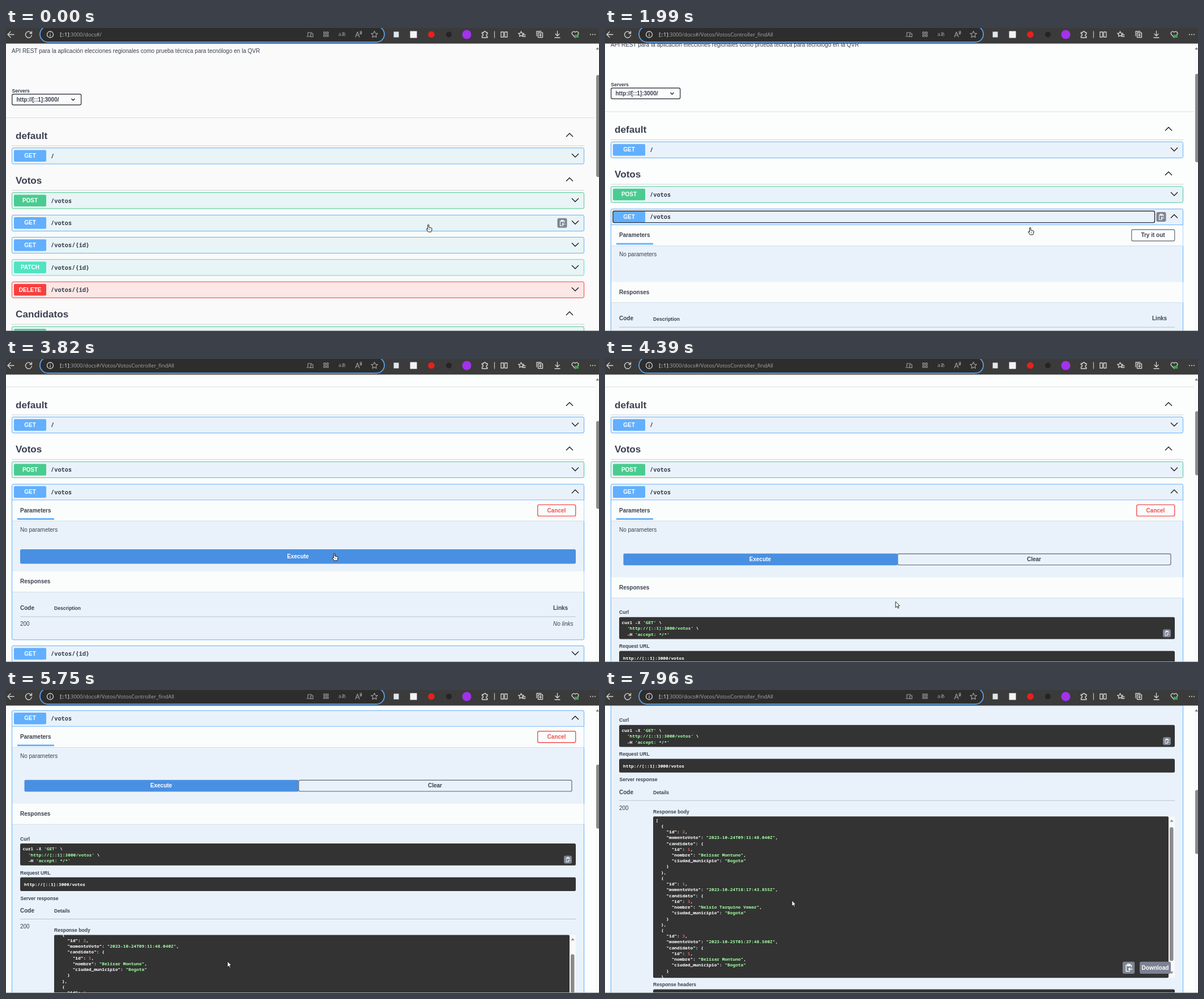
Recreate the animation shown at these times as an HTML page. Size 1047 px wide and 535 px high, loop 8 s.

```html
<!DOCTYPE html>
<html lang="es">
<head>
<meta charset="utf-8">
<title>API docs</title>
<style>
html, body { margin: 0; width: 100%; height: 100%; overflow: hidden; background: #fafafa; }
svg { display: block; width: 100%; height: 100%; --page: #fafafa; --tint: #e8f4f6; }
svg.open { --page: #fcfdfd; --tint: #e9f2fa; }
text { font-family: "Liberation Sans", Arial, sans-serif; fill: #3b4151; white-space: pre; }
.b { font-weight: 700; }
.i { font-style: italic; }
.m { text-anchor: middle; }
.w { fill: #fff; }
.mono { font-family: "Noto Sans Mono", "DejaVu Sans Mono", monospace; font-weight: 700; }
.url { font-family: "Open Sans", "Noto Sans", sans-serif; fill: #a6a6a6; }
.ico { fill: none; stroke: #d6d6d6; stroke-width: 1.1; stroke-linejoin: round; stroke-linecap: round; }
</style>
</head>
<body>
<svg id="stage" viewBox="0 0 1047 535" preserveAspectRatio="none"></svg>
<script>
const LOOP = 8000, OPEN = 1230, TRY = 3210, RESULT = 4010;
const BLOCK_Y = 330, BOX_Y = 396.5, BOX_H = 285, LINE_H = 10.23;
const BLUE = '#61affe', DARK = '#333', GREY = '#7d8492';
const METHODS = { GET: BLUE, POST: '#49cc90', PATCH: '#50e3c2', DELETE: '#f93e3e' };

// ---- markup helpers (y of a text is its visual middle)
const rect = (x, y, w, h, fill, more = '') =>
  `<rect x="${x}" y="${y}" width="${w}" height="${h}" fill="${fill}" ${more}/>`;
const text = (x, y, str, cls = '', size = 10) =>
  `<text x="${x}" y="${y + size * .36}" font-size="${size}" class="${cls}">${str}</text>`;
const small = (x, y, str) => text(x, y, str, 'b', 8.55);
const rule = (x1, x2, y, color) => rect(x1, y - .5, x2 - x1, 1, color);
const group = (id, inner, more = '') => `<g id="${id}" ${more}>${inner}</g>`;
const path = (d, more = '') => `<path d="${d}" ${more}/>`;
const chevron = (x, y, up) => {
  const k = up ? 1 : -1;
  return path(`M${x - 6} ${y + 3 * k}l6 ${-6 * k} 6 ${6 * k}`, 'fill="none" stroke="#1d1d1f" stroke-width="1.4"');
};
const frame = (x, y, w, h, color) =>
  rect(x, y, w, h, 'none', `rx="2.5" stroke="${color}" stroke-width="1.4"`);
const code = (x, y, line) => text(x, y, line
  .replace(/: (\d+)(?=,)/, ': <tspan fill="#d36363">$1</tspan>')
  .replace(/: ("[^"]*")/, ': <tspan fill="#a2fca2">$1</tspan>')
  .replace(/'[^']*'/, '<tspan fill="#a2fca2">$&</tspan>'), 'mono w', 7.82);
const copyButton = (x, y, size) => {
  const k = size / 17;
  return rect(x - size / 2, y - size / 2, size, size, GREY, 'rx="3"') +
    path('M2 5h-5.5v-8.500h7.500v3M-1.500-5h3.500v2.500h-3.500zM5.500 2h-5M2 0l-2 2 2 2',
      `transform="translate(${x} ${y}) scale(${k})" fill="none" stroke="#fff" stroke-width="1.1"`);
};

function summary(y, method, route) {
  return rect(14, y - 10.3, 57, 20.5, METHODS[method], 'rx="2"') +
    text(42.5, y - .4, method, 'b m w') + text(79, y, route, 'mono', 10.35);
}
function row(y, method, route) {
  const fill = method === 'DELETE' ? '#fbe7e5' : 'var(--tint)';
  return rect(10.5, y - 14.2, 1010, 28.3, fill, `rx="2.5" stroke="${METHODS[method]}"`) +
    summary(y, method, route) + chevron(1005, y - 1, false);
}
function heading(y, title) {
  return text(17, y, title, 'b', 17.15) + chevron(995, y - 1, true) + rule(10, 1021, y + 18, '#cfd1d6');
}
const band = (y, title) =>
  rect(11, y, 1009.5, 36.3, '#fbfdfd') + rule(11, 1020.5, y + 36.5, '#d6dfe8') + text(25, y + 17.7, title, 'b');

// ---- page content
const topPart =
  text(10, 40, 'API REST para la aplicación elecciones regionales como prueba técnica para tecnólogo en la QVR') +
  small(10.5, 110.5, 'Servers') + frame(10.7, 116.7, 122, 19, '#41444e') +
  text(18.5, 126, 'http://[::1]:3000/', 'b') +
  path('M115.500 124.800l3 3 3-3', 'fill="none" stroke="#222" stroke-width="1.4"') +
  rule(0, 1040, 158.5, '#dcdee1') +
  heading(190, 'default') + row(225.9, 'GET', '/') +
  heading(268.6, 'Votos') + row(304.8, 'POST', '/votos');

const lowerPart = row(383.6, 'GET', '/votos/{id}') + row(422.9, 'PATCH', '/votos/{id}') +
  row(462.3, 'DELETE', '/votos/{id}') + heading(505, 'Candidatos') + row(541.5, 'POST', '/candidatos');

const responses = dy => band(129 + dy, 'Responses') +
  text(25, 193.5 + dy, 'Code', 'b') + small(85, 194.3 + dy, 'Description') + text(966, 193.5 + dy, 'Links', 'b') +
  rule(25, 1006, 209 + dy, '#b9c3cf') +
  text(25, 221.3 + dy, '200') + text(966, 221.3 + dy, 'No links', 'i');

const params = rule(10, 1021, 28.3, BLUE) + band(28.8, 'Parameters') +
  rect(20, 60.4, 65, 2.8, BLUE) + text(25, 80.3, 'No parameters') + chevron(1005, 13.2, true);

const cancel = frame(938.7, 36.7, 67, 20, '#f2504f') +
  `<g style="--c:#f2504f">${text(972, 46.3, 'Cancel', 'b m').replace('<text', '<text style="fill:var(--c)"')}</g>`;

const votes = [
  [2, '2023-10-24T09:11:48.040Z', 1, 'Belisar Montuno'],
  [1, '2023-10-24T18:17:43.855Z', 3, 'Nelsio Tarquino Vemar'],
  [3, '2023-10-25T01:37:48.560Z', 1, 'Belisar Montuno']
];
const body = JSON.stringify(votes.map(([id, momentoVoto, who, nombre]) => (
  { id, momentoVoto, candidato: { id: who, nombre, ciudad_municipio: 'Bogota' } })), null, 2).split('\n');

const result =
  rect(32.5, 122.7, 484, 20.8, '#4990e2', 'rx="2"') + text(274, 132.7, 'Execute', 'b m w') +
  frame(516.7, 123.3, 482.300, 19.6, '#777d87') + text(757.5, 132.7, 'Clear', 'b m') +
  band(164.7, 'Responses') +
  small(25, 226.5, 'Curl') + rect(25, 235, 981, 38.8, DARK, 'rx="2.5"') +
  ["curl -X 'GET' \\", "  'http://[::1]:3000/votos' \\", "  -H 'accept: */*'"]
    .map((l, i) => code(29.5, 244.6 + i * LINE_H, l)).join('') +
  copyButton(992, 263.500, 14) +
  small(25, 286.5, 'Request URL') + rect(25, 294.7, 981, 24.3, DARK, 'rx="2.5"') +
  code(32, 307, 'http://[::1]:3000/votos') +
  small(25.5, 331.5, 'Server response') +
  text(25, 353.5, 'Code', 'b') + small(85, 354, 'Details') + rule(25, 1006, 368.4, '#b9c3cf') +
  text(25, 381.5, '200') + small(85, 388.4, 'Response body') +
  rect(85, BOX_Y, 921, BOX_H, '#f8f9fa', 'rx="2.5"') + rect(85, BOX_Y, 910, BOX_H, DARK, 'rx="2"') +
  `<g clip-path="url(#box)">${group('json',
    body.map((l, i) => code(89.5, BOX_Y + 10 + i * LINE_H, l)).join(''))}</g>` +
  path(`M997.500 ${BOX_Y + 9.5}l3-4 3 4zM997.500 ${BOX_Y + 274}l3 4 3-4z`, 'fill="#8b8b8b"') +
  rect(997, 0, 6.5, 236, '#8b8b8b', 'rx="3.200" id="innerThumb"') +
  copyButton(924.5, BOX_Y + 267, 21.3) +
  rect(944, BOX_Y + 256.4, 55, 21.3, '#7d8293', 'rx="3"') + text(971.5, BOX_Y + 267, 'Download', 'b m w') +
  small(85, 693.3, 'Response headers') + rect(85, 701.7, 921, 90, DARK, 'rx="2.5"');

const block =
  rect(10.5, .3, 1010, 28.3, 'var(--tint)', `rx="2.5" stroke="${BLUE}" id="blockRect"`) +
  summary(14.2, 'GET', '/votos') +
  group('closed', chevron(1005, 13.2, false)) +
  group('hover', copyButton(982, 14.2, 17)) +
  group('focus', frame(14, 4, 956.5, 20.3, '#2b303c')) +
  group('params', params) +
  group('tryView', frame(929.7, 36.7, 76, 20, '#767c87') + text(967.5, 46.3, 'Try it out', 'b m') + responses(0)) +
  group('cancel', cancel) +
  group('execView', rect(25, 115.3, 981, 25.4, '#4990e2', 'rx="2.5"') +
    text(515.5, 127.7, 'Execute', 'b m w') + responses(25.3)) +
  group('resultView', result);

// ---- browser bar
const star = (x, y, r) => 'M' + Array.from({ length: 10 }, (_, i) => {
  const a = i * Math.PI / 5 - Math.PI / 2, q = i % 2 ? r * .48 : r;
  return `${(x + q * Math.cos(a)).toFixed(1)} ${(y + q * Math.sin(a)).toFixed(1)}`;
}).join('L') + 'z';
const icons = [
  'M14 11.500H3.500M8 6.500l-5 5 5 5',
  'M45 9.500a5.500 5.500 0 1 0 .4 3M45.500 6v3.500h-3.500',
  'M840.500 8h3a2 2 0 0 1 4 0h2.500v3a2 2 0 0 0 0 4v2h-9.500v-3a2 2 0 0 0 0-4z',
  'M874 7h4.500v9h-4.500zM880.500 7h4.500v9h-4.500z',
  star(909.500, 11, 5) + 'M913 12h4M913 15h4',
  'M939.500 8.500h8v8h-8zM937 14V6h8M943.500 10.500v4M941.500 12.500h4',
  'M973.500 5.500v8.500M970 10.500l3.500 3.500 3.500-3.500M969 17h9',
  'M1005 17l-5-5.500a3 3 0 0 1 5-4 3 3 0 0 1 5 4z'
];
const dimIcons = [
  'M533 13.500v-5.500h7M531 15h6M538 10h4v5.500h-4z',
  'M561 7h3v3h-3zM566 7h3v3h-3zM561 12h3v3h-3zM566 12h3v3h-3z',
  'M617 16l3.500-9 3.500 9M618.500 13h4M625 6a4 4 0 0 1 0 5M627 5a6 6 0 0 1 0 6',
  star(650.500, 11.500, 6)
];
const bar = rect(0, 0, 1047, 27.5, '#3b3b3b') +
  rect(60, -3, 608, 28, '#2d2d2d', 'rx="14" stroke="#5c9fe6" stroke-width="1.8"') +
  `<g class="ico" style="stroke-width:1.300">${icons.map(d => path(d)).join('')}
    <circle cx="78" cy="11.500" r="5.500"/><path d="M78 11v3.500M78 8.600v.2M862.500 6v11" stroke="#bbb"/></g>
  <g class="ico" style="stroke:#a4a4a4">${dimIcons.map(d => path(d)).join('')}</g>
  <path d="M1004 12h7v5h-7z" fill="#3fa14b"/>` +
  text(587, 11, 'aあ', 'url', 8.5) +
  `<text x="95" y="15" font-size="9.400" class="url"><tspan fill="#f2f2f2">[::1]</tspan>:3000/docs#/<tspan id="hash"></tspan></text>` +
  rect(684.5, 6.5, 9, 10, '#dfe6ec') + rect(713.5, 5.5, 12, 12, '#f4f4f6') +
  [[751, 5.8, '#e8201c'], [782, 5, '#242424'], [813.5, 8, '#a331ee']]
    .map(([x, r, c]) => `<circle cx="${x}" cy="11.500" r="${r}" fill="${c}"/>`).join('') +
  [1032, 1036, 1040].map(x => `<circle cx="${x}" cy="11.500" r="1" fill="#ddd"/>`).join('');

const cursors =
  group('arrow', path('M0 0v10.500l2.500-2.300 1.700 3.600 1.600-.8-1.700-3.500h3.100z',
    'fill="#fff" stroke="#111" stroke-width=".9"')) +
  group('hand', path('M-.9 1a1.100 1.100 0 0 1 2.100 0v4l4.600 1.200q1 .4.800 1.800l-.7 3.300-.9 1.700h-4.800l-3.300-4.300q-.4-1.300.8-1.300l1.400 1z',
    'fill="#fff" stroke="#111" stroke-width="1"') + path('M1.500 7.500v3M3.300 7.700v2.800', 'stroke="#555" stroke-width=".6"'));

const stage = document.getElementById('stage');
stage.innerHTML =
  `<clipPath id="box">${rect(85, BOX_Y, 910, BOX_H, '#000')}</clipPath>` +
  rect(0, 0, 1047, 535, 'var(--page)') +
  group('page', topPart + group('lower', lowerPart) + group('block', block, `transform="translate(0 ${BLOCK_Y})"`)) +
  rect(1041, 28, 6, 507, '#fafafa') + path('M1041.500 38l2.800-4 2.700 4z', 'fill="#777"') +
  rect(1042, 0, 7, 0, '#8b8b8b', 'rx="3" id="thumb"') +
  bar + rule(0, 1047, 534.5, '#a3a5a8') + group('cursor', cursors);

// ---- motion tables: [time, value...]
const scrollTrack = [[1960, 0], [1990, 10.7], [2020, 10.7], [2120, 60], [2250, 98], [2410, 109.3],
  [4600, 109.3], [4650, 150], [4750, 276.7], [4850, 276.7], [4950, 290], [5130, 294],
  [6520, 294], [6560, 445.2], [6630, 445.2], [6710, 503.2]];
const innerTrack = [[4900, 0], [5130, 17], [5269, 17], [5270, 19], [5749, 19], [5750, 20.8],
  [7640, 20.8], [7740, 12], [7850, 6.5], [7960, 3.5]];
const mouseTrack = [[380, 745.5, 347], [620, 726, 352], [900, 740, 356.5], [1080, 752, 354], [1140, 750.5, 352],
  [2490, 750.5, 352], [2780, 964, 263], [3230, 964, 263], [3480, 668, 317], [3690, 668, 317],
  [3820, 579.5, 343], [4100, 579.5, 343], [4460, 506, 437.5], [5460, 506, 437.5], [5570, 391, 479],
  [6230, 391, 479], [6360, 523, 367], [7000, 523, 367], [7160, 330, 371.5]];
const handTimes = [[0, 2020], [2720, 3290], [3780, 4150]];

function at(track, t, ease = k => k) {
  const n = track.findIndex(p => p[0] > t);
  if (n === 0) return track[0].slice(1);
  if (n < 0) return track[track.length - 1].slice(1);
  const a = track[n - 1], b = track[n], k = ease((t - a[0]) / (b[0] - a[0]));
  return a.slice(1).map((v, i) => v + (b[i + 1] - v) * k);
}
const smooth = k => k * k * (3 - 2 * k);
const $ = id => document.getElementById(id);
const show = (id, on) => { $(id).style.display = on ? '' : 'none'; };
const move = (id, x, y) => $(id).setAttribute('transform', `translate(${x} ${y})`);
const set = (id, attrs) => { for (const k in attrs) $(id).setAttribute(k, attrs[k]); };

function draw(t) {
  const open = t >= OPEN, tried = t >= TRY, done = t >= RESULT;
  const [scroll] = at(scrollTrack, t), [inner] = at(innerTrack, t);
  const [mx, my] = at(mouseTrack, t, smooth);

  stage.classList.toggle('open', open);
  $('hash').textContent = open ? 'Votos/VotosController_findAll' : '';
  move('page', t >= 4650 && t < 4950 ? 10 : 0, -scroll);
  move('lower', 0, done ? 900 : tried ? 246.3 : open ? 221.2 : 0);
  set('blockRect', { height: done ? 880 : tried ? 274.8 : open ? 249.5 : 28.3 });
  show('closed', !open);
  show('hover', !tried);
  show('focus', open && !tried);
  show('params', open);
  show('tryView', open && !tried);
  show('cancel', tried);
  show('execView', tried && !done);
  show('resultView', done);

  move('json', 0, -inner);
  set('innerThumb', { y: BOX_Y + 16 + inner * .87 });
  const [top, height] = done ? [68.9 + scroll * .2136, 113]
    : open ? [77.9 + scroll * .29, tried ? 155 : 156] : [83, 180];
  set('thumb', { y: top, height });

  const hand = handTimes.some(([a, b]) => t >= a && t < b);
  show('hand', hand);
  show('arrow', !hand);
  move('cursor', mx, my);
}

const start = performance.now();
function tick() {
  draw((performance.now() - start) % LOOP);
  requestAnimationFrame(tick);
}
draw(0);
tick();
</script>
</body>
</html>
```
